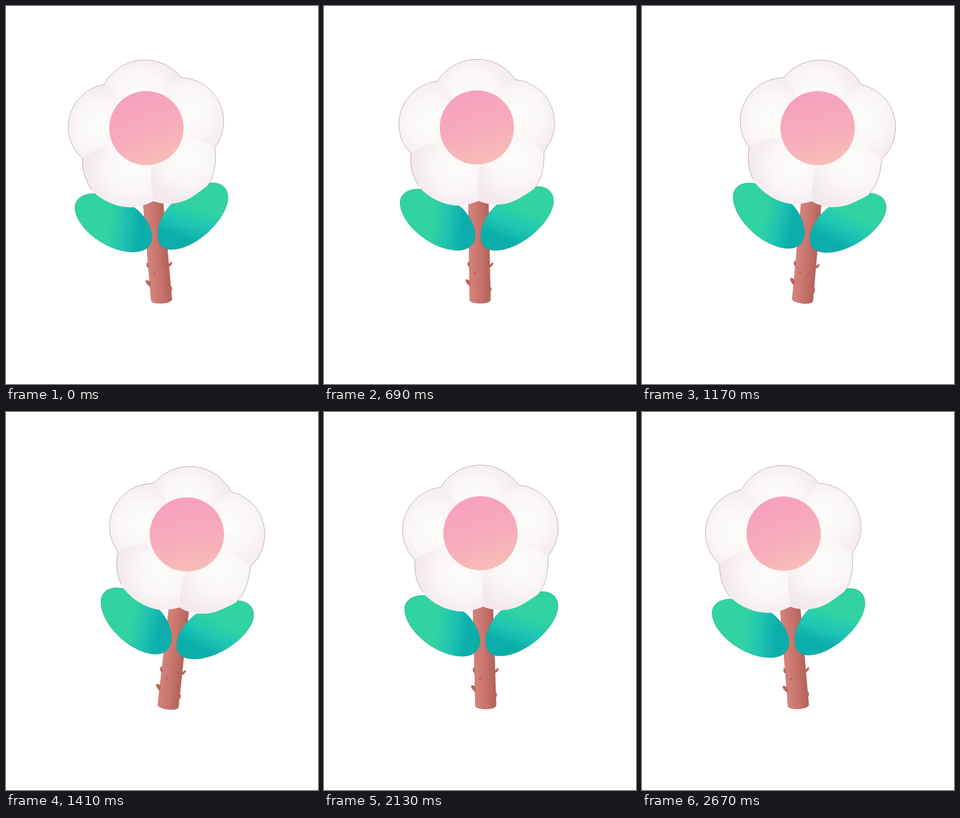
Write an HTML page that moves like this. It is 551 px wide and 669 px high and loops after 2700 ms.

```html
<!DOCTYPE html>
<html lang="en">
<head>
<meta charset="utf-8">
<title>Swaying flower</title>
<style>
  html, body { margin: 0; width: 100%; height: 100%; overflow: hidden; background: #fff; }
  svg { display: block; }
</style>
</head>
<body>
<svg width="551" height="669" viewBox="0 0 551 669">
  <defs>
    <linearGradient id="bark" gradientUnits="userSpaceOnUse" x1="249" y1="437" x2="285" y2="434">
      <stop stop-color="#d4837b"/><stop offset=".5" stop-color="#c9756d"/><stop offset="1" stop-color="#b3635c"/>
    </linearGradient>
    <linearGradient id="leafL" gradientUnits="userSpaceOnUse" x1="182" y1="385" x2="236" y2="388">
      <stop stop-color="#30d3a1"/><stop offset=".5" stop-color="#1fc3b2"/><stop offset="1" stop-color="#0baeab"/>
    </linearGradient>
    <linearGradient id="leafR" gradientUnits="userSpaceOnUse" x1="335" y1="355" x2="318" y2="412">
      <stop stop-color="#30d3a1"/><stop offset=".5" stop-color="#1fc8b4"/><stop offset="1" stop-color="#0baeab"/>
    </linearGradient>
    <linearGradient id="core" gradientUnits="userSpaceOnUse" x1="225" y1="165" x2="272" y2="278">
      <stop stop-color="#f7a1be"/><stop offset=".5" stop-color="#f6abbc"/><stop offset="1" stop-color="#f8bdb7"/>
    </linearGradient>
  </defs>
  <g id="flower">
    <path fill="url(#bark)" stroke="#b3655e" stroke-width=".6" d="M241 335L256.500 522Q258 526.300 274 526.300Q291 525.300 293 519.300L276.500 335Z"/>
    <g fill="#b9645d" stroke="#b9645d" stroke-width=".8">
      <path d="M249.500 462Q247 456 250 454L252 463Z"/>
      <path d="M285 457L289 456Q291 452 293 453Q293 459 288 461L285 460Z"/>
      <path d="M255 497Q247 492 247 486Q253 485 255 490Z"/>
      <path d="M290 496Q293 496 293 500Q293 504 291 505Z"/>
      <ellipse cx="278" cy="457.500" rx="1.700" ry="2"/>
      <ellipse cx="262" cy="473" rx="1.500" ry="2.200" transform="rotate(25 262 473)"/>
    </g>
    <g stroke="#1f9f8c" stroke-width=".6">
      <path fill="url(#leafL)" d="M155 332C134 332 120 343 122 360C126 395 179 435.500 225 435.500C247 435.500 259 424 258 406C256 386 240 366 227 357C200 340 175 332 155 332Z"/>
      <path fill="url(#leafR)" d="M362 313C382 312 392 323 392 340C390 378 335 431 292 431C275 431 267 419 268 402C269 379 283 358 298 345C320 330 340 317 362 313Z"/>
    </g>
    <g id="petals"></g>
    <circle cx="247.900" cy="216.100" r="65.900" fill="url(#core)" stroke="#fdf1f2" stroke-width=".5"/>
  </g>
</svg>
<script>
const $ = id => document.getElementById(id);

// Each petal: seam out from the core, outer edge, seam back in, light centre.
const petals = [
  { out: "L198 163Q188 147 173 139", edge: "A82 82 0 0 1 310 127", back: "Q296 138 286 155", light: [236, 160] },
  { out: "L286 155Q296 138 310 127", edge: "A77 77 0 0 1 369 250", back: "Q345 236 323 232L314 215", light: [320, 188] },
  { out: "L314 215L323 232Q345 236 369 250", edge: "C372 280 367 303 356 317C352 321 342 328 330 336.500C311 349 285 354 260 345", back: "Q255 315 256 288L262 281", light: [319, 267] },
  { out: "L262 281L256 288Q255 315 260 345", edge: "C250 350 236 355.500 222 356C204 356 184 351 163.500 336.500C145 323 134 300 135 270", back: "Q154 254 178 246L187 252", light: [221, 287] },
  { out: "L187 252L178 246Q154 254 135 270", edge: "C121 258 110 238 110 215C110 178 135 146 173 139", back: "Q188 147 198 163", light: [167, 214] }
];
const edges = petals.map(p => p.edge);

$("petals").innerHTML =
  `<path d="M173 139${edges.join("")}Z" fill="#fbf8f8" stroke="#f6eef0" stroke-width=".8"/>` +
  petals.map((p, i) => `
    <radialGradient id="petal${i}" gradientUnits="userSpaceOnUse" cx="${p.light[0]}" cy="${p.light[1]}" r="86">
      <stop stop-color="#fdfdfb"/><stop offset=".5" stop-color="#faf7f6"/><stop offset="1" stop-color="#f3e7ec"/>
    </radialGradient>
    <path d="M248 216${p.out}${p.edge}${p.back}Z" fill="url(#petal${i})"/>`).join("") +
  `<path d="M152 326C140 309 134.500 292 135 270${edges[4]}${edges[0]}${edges[1]}C372 280 367 303 357 316"
    fill="none" stroke="#a3969b" stroke-width=".7"/>`;

// time, x shift, y shift, rotation in degrees
const keys = [
  [0, 0, 0, 0],
  [630, 0, 0, 3.2],
  [1335, 11.5, 0, 12.1],
  [2100, 11.5, -0.5, 3.47],
  [2700, 1, -0.8, -0.05]
];

function pose(t) {
  const i = keys.findIndex(k => k[0] > t);
  const a = keys[i - 1], b = keys[i];
  const k = (t - a[0]) / (b[0] - a[0]);
  return a.map((v, j) => v + (b[j] - v) * k);
}

function draw() {
  const t = Math.floor(performance.now() % 2700 / 30) * 30;
  const [, x, y, angle] = pose(t);
  $("flower").setAttribute("transform", `translate(${x} ${y}) rotate(${angle} 274.5 521)`);
  requestAnimationFrame(draw);
}
draw();
</script>
</body>
</html>
```
